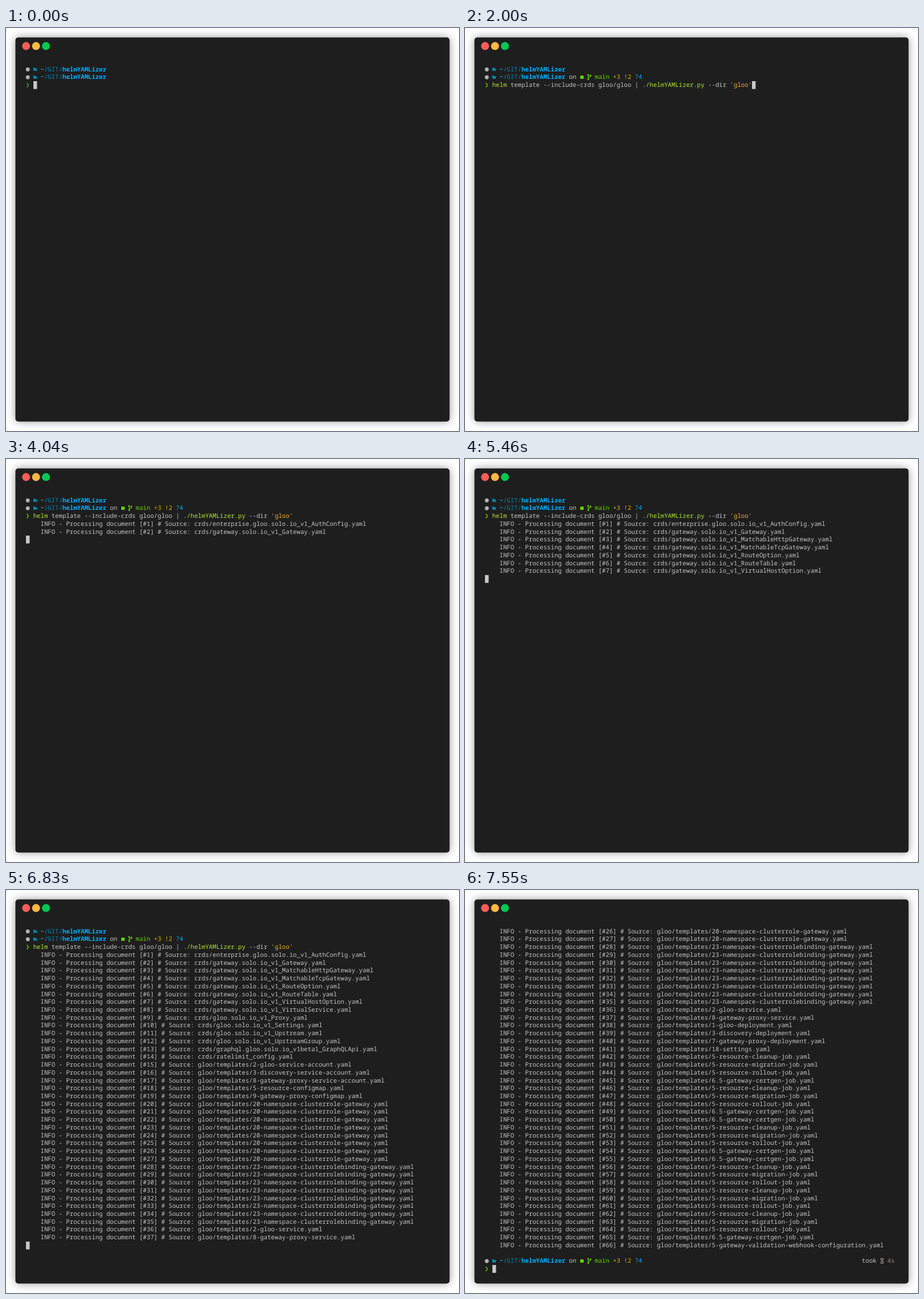
These frames come from a looping animation (794x705 px, 8 s). An HTML page with a canvas:

```html
<!DOCTYPE html>
<html lang="en">
<head>
<meta charset="utf-8">
<title>Terminal</title>
<style>
  html, body { margin: 0; width: 100%; height: 100%; overflow: hidden; background: #fff; }
  canvas { display: block; }
</style>
</head>
<body>
<canvas id="stage" width="794" height="705"></canvas>
<script>
const ctx = document.getElementById('stage').getContext('2d');
const LOOP = 8000, ROWS = 44;
const LEFT = 34.8, TOP = 65.6, CELL = 6.415, LINE = 13.73;
const FONT = '10.69px "Noto Sans Mono", "DejaVu Sans Mono", monospace';
const GREY = '#c5c5c5', TEAL = '#0087af', SKY = '#00afff', GREEN = '#5fd700',
      GOLD = '#d7af00', LIME = '#b4e636', ORANGE = '#f5ad35', OLIVE = '#8f8f78';

const COMMAND = [
  ['helm', LIME], [' template --include-crds gloo/gloo | ', GREY],
  ['./helmYAMLizer.py', LIME], [' --dir ', GREY], ["'gloo'", ORANGE],
];
const COMMAND_LENGTH = COMMAND.reduce((n, [text]) => n + text.length, 0);

const crds = (prefix, kinds) => kinds.split(' ').map(kind => `crds/${prefix}${kind}`);
const templates = names => names.split(' ').map(name => `gloo/templates/${name}`);
const JOBS = { c: '5-resource-cleanup', m: '5-resource-migration', r: '5-resource-rollout', g: '6.5-gateway-certgen' };
const DOCS = [
  ...crds('enterprise.gloo.solo.io_v1_', 'AuthConfig'),
  ...crds('gateway.solo.io_v1_', 'Gateway MatchableHttpGateway MatchableTcpGateway RouteOption RouteTable VirtualHostOption VirtualService'),
  ...crds('gloo.solo.io_v1_', 'Proxy Settings Upstream UpstreamGroup'),
  ...crds('graphql.gloo.solo.io_v1beta1_', 'GraphQLApi'),
  ...crds('', 'ratelimit_config'),
  ...templates('2-gloo-service-account 3-discovery-service-account 8-gateway-proxy-service-account 5-resource-configmap 9-gateway-proxy-configmap'),
  ...Array(8).fill('gloo/templates/20-namespace-clusterrole-gateway'),
  ...Array(8).fill('gloo/templates/23-namespace-clusterrolebinding-gateway'),
  ...templates('2-gloo-service 8-gateway-proxy-service 1-gloo-deployment 3-discovery-deployment 7-gateway-proxy-deployment 18-settings'),
  ...[...'cmrgcmrggcmrggcmrcmrcmrg'].map(key => `gloo/templates/${JOBS[key]}-job`),
  ...templates('5-gateway-validation-webhook-configuration'),
];

// [time in ms, value from then on]
const TYPED = [[0, 0], [1110, 1], [1200, 2], [1290, 3], [1380, 4], [1470, 5], [1980, COMMAND_LENGTH]];
const PRINTED = [
  [0, 0], [3380, 1], [4040, 2], [4360, 3], [4570, 4], [4790, 5], [5170, 6], [5460, 7],
  [6050, 8], [6270, 9], [6360, 10], [6510, 11], [6670, 14], [6750, 24], [6830, 37],
  [6930, 41], [7030, 48], [7130, 56], [7230, 63], [7330, 65], [7430, 66],
];
const GIT_AT = 140, ENTER_AT = 2990, DONE_AT = 7530, DONE_GIT_AT = 7550;
const valueAt = (steps, t) => steps.reduce((value, [at, next]) => t >= at ? next : value, 0);

const colX = col => LEFT + col * CELL;
const rowY = row => TOP + row * LINE;

// Every character sits on the terminal grid.
function write(row, col, text, color, bold = false) {
  ctx.font = (bold ? 'bold ' : '') + FONT;
  ctx.fillStyle = color;
  for (const char of text) {
    if (char !== ' ') ctx.fillText(char, colX(col), rowY(row) + 10.1);
    col++;
  }
  return col;
}

function dot(x, y, r, color) {
  ctx.fillStyle = color;
  ctx.beginPath();
  ctx.arc(x, y, r, 0, Math.PI * 2);
  ctx.fill();
}

// Icon paths are relative to the top left of their cell.
function icon(row, col, path, color, stroke = false) {
  ctx.save();
  ctx.translate(colX(col), rowY(row));
  ctx.fillStyle = ctx.strokeStyle = color;
  ctx.lineWidth = 1.2;
  ctx[stroke ? 'stroke' : 'fill'](new Path2D(path));
  ctx.restore();
}

const FOLDER = 'M.2 4.2Q.2 3.6 .8 3.6H2.6L3.4 4.6H5.2L6.6 6.4V9.4H.8Q.2 9.4 .2 8.8Z';
const SQUARE = 'M.4 4H6.4V9.6H.4Z';
const BRANCH = 'M1.5 3.4V10M1.5 8Q1.8 7 3.5 6.8Q5.4 6.4 5.5 4.4';
const HOURGLASS = 'M.6 2.4H6.2M.6 10.6H6.2M1.3 2.4V4L3.4 6.5L1.3 9V10.6M5.5 2.4V4L3.4 6.5L5.5 9V10.6';

function prompt(row, git) {
  dot(colX(0) + 3.4, rowY(row) + 6.9, 3.4, '#b2b2b2');
  icon(row, 2, FOLDER, TEAL);
  write(row, 4, '~', SKY, true);
  write(row, 5, '/GIT/', TEAL);
  write(row, 10, 'helmYAMLizer', SKY, true);
  if (!git) return;
  write(row, 23, 'on', GREY);
  icon(row, 26, SQUARE, GREEN);
  icon(row, 28, BRANCH, GREEN, true);
  for (const [x, y] of [[1.5, 2.8], [1.5, 10.4], [5.5, 3.8]])
    dot(colX(28) + x, rowY(row) + y, 1.4, GREEN);
  write(row, 30, 'main', GREEN);
  write(row, 35, '+3 !2', GOLD);
  write(row, 41, '?4', SKY);
}

function commandLine(row, typed, color) {
  write(row, 0, '❯', color);
  let col = 2, left = typed;
  for (const [text, ink] of COMMAND) {
    const shown = text.slice(0, left);
    col = write(row, col, shown, ink);
    left -= shown.length;
  }
}

function drawWindow() {
  ctx.fillStyle = '#fff';
  ctx.fillRect(0, 0, 794, 705);
  ctx.save();
  ctx.shadowColor = 'rgba(0,0,0,.4)';
  ctx.shadowBlur = 15;
  ctx.fillStyle = '#1e1e1e';
  ctx.beginPath();
  ctx.roundRect(16.5, 16.5, 761, 672, 5);
  ctx.fill();
  ctx.restore();
  ['#ff5c57', '#ffb941', '#00c853'].forEach((color, i) => dot(35.2 + i * 17.4, 31.6, 7, color));
}

function draw(t) {
  const typed = valueAt(TYPED, t), printed = valueAt(PRINTED, t), done = t >= DONE_AT;
  const cursorLine = done ? 71 : t >= ENTER_AT ? printed + 3 : 2;
  const cursorCol = done ? 2 : t >= ENTER_AT ? 0 : 2 + typed;
  const scroll = Math.max(0, cursorLine - ROWS + 1);

  drawWindow();
  if (!scroll) {
    prompt(0, false);
    prompt(1, t >= GIT_AT);
    commandLine(2, typed, t >= GIT_AT ? GREEN : '#35b835');
  }
  for (let n = 1; n <= printed; n++) {
    const row = n + 2 - scroll;
    if (row >= 0) write(row, 4, `INFO - Processing document [#${n}] # Source: ${DOCS[n - 1]}.yaml`, GREY);
  }
  if (done) {
    prompt(42, t >= DONE_GIT_AT);
    write(42, 103, 'took', GREY);
    icon(42, 108, HOURGLASS, OLIVE, true);
    write(42, 110, '4s', OLIVE);
    commandLine(43, 0, GREEN);
  }
  ctx.fillStyle = '#c7c7c7';
  ctx.fillRect(Math.round(colX(cursorCol)), Math.round(rowY(cursorLine - scroll) - .4 + .5), 6.4, 13.7);
}

ctx.textRendering = 'geometricPrecision';
const start = performance.now();
function tick() {
  draw((performance.now() - start) % LOOP);
  requestAnimationFrame(tick);
}
tick();
</script>
</body>
</html>
```
